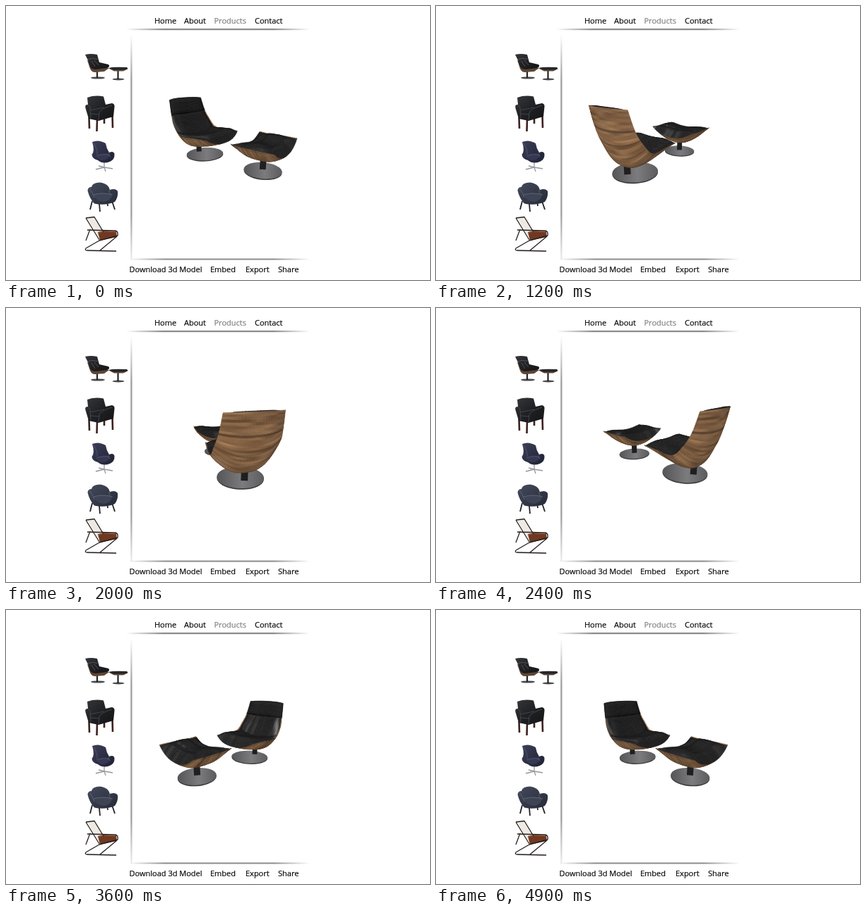
Animation, 600 px wide and 389 px high, one loop 5 s. Source, as an HTML page with a canvas:

```html
<!DOCTYPE html>
<html lang="en">
<head>
<meta charset="utf-8">
<title>Chair viewer</title>
<style>
  html, body { margin: 0; width: 100%; height: 100%; overflow: hidden; background: #fff; }
  svg, canvas { position: absolute; left: 0; top: 0; width: 100%; height: 100%; display: block; }
  text { font: 11px "Open Sans", "Noto Sans", sans-serif; fill: #0a0a0a; stroke: #0a0a0a; stroke-width: .2; }
  .active { fill: #808080; stroke: #808080; }
</style>
</head>
<body>
<svg viewBox="0 0 600 389">
  <defs>
    <linearGradient id="fadeX">
      <stop offset="0" stop-color="#777" stop-opacity="0"/>
      <stop offset=".2" stop-color="#777" stop-opacity=".85"/>
      <stop offset=".8" stop-color="#777" stop-opacity=".85"/>
      <stop offset="1" stop-color="#777" stop-opacity="0"/>
    </linearGradient>
    <linearGradient id="fadeY" x2="0" y2="1">
      <stop offset="0" stop-color="#888" stop-opacity="0"/>
      <stop offset=".2" stop-color="#888" stop-opacity=".85"/>
      <stop offset=".8" stop-color="#888" stop-opacity=".85"/>
      <stop offset="1" stop-color="#888" stop-opacity=".15"/>
    </linearGradient>
    <linearGradient id="black" x2="1" y2="1">
      <stop offset="0" stop-color="#36373a"/><stop offset=".5" stop-color="#202124"/><stop offset="1" stop-color="#141416"/>
    </linearGradient>
    <linearGradient id="navy" x2="1" y2="1">
      <stop offset="0" stop-color="#3c3f57"/><stop offset="1" stop-color="#1e2033"/>
    </linearGradient>
    <linearGradient id="slate" x2="1" y2="1">
      <stop offset="0" stop-color="#454b5c"/><stop offset="1" stop-color="#252936"/>
    </linearGradient>
  </defs>

  <g>
    <text x="210" y="24.5">Home</text>
    <text x="252" y="24.5">About</text>
    <text x="294.5" y="24.5" class="active">Products</text>
    <text x="352" y="24.5">Contact</text>
    <text x="174.5" y="378">Download 3d Model</text>
    <text x="289" y="378">Embed</text>
    <text x="339" y="378">Export</text>
    <text x="385" y="378">Share</text>
  </g>

  <g>
    <rect x="170" y="32" width="260" height="2" fill="url(#fadeX)"/>
    <rect x="170" y="34" width="260" height="1" fill="url(#fadeX)" opacity=".25"/>
    <rect x="174" y="358.5" width="256" height="2" fill="url(#fadeX)"/>
    <rect x="176.3" y="40" width="2" height="320" fill="url(#fadeY)"/>
    <rect x="178.3" y="40" width="1" height="320" fill="url(#fadeY)" opacity=".25"/>
  </g>

  <!-- lounge chair with footrest -->
  <g>
    <ellipse cx="130" cy="102" rx="10" ry="1.6" fill="#4b4b4d"/>
    <ellipse cx="159" cy="104" rx="8.500" ry="1.400" fill="#4b4b4d"/>
    <path d="M129 93V102M158.500 91V104" stroke="#222" stroke-width="2.200"/>
    <path d="M115 77L119 89Q121 94 126 94L139 93L146 88L132 86Z" fill="#5e4634"/>
    <path d="M112 69Q120 67 129 69L132 80L145 83Q148 86 143 88L127 90Q121 90 119 86L116 77Z" fill="url(#black)"/>
    <path d="M115 76Q122 73 130 75.500M121 78L126 86M125 77L131 84" fill="none" stroke="#66686c" stroke-width=".7"/>
    <path d="M145 88.500L153 92.500H166L173 89Z" fill="#5e4634"/>
    <path d="M145 88Q151 86 171 87Q174 89 169 90.500L153 91Z" fill="#28282a"/>
  </g>

  <!-- armchair -->
  <g>
    <path d="M117.500 158L118 174M129 160L128.500 178M150.500 154L151 173M139 158L139 167" stroke="#3f211f" stroke-width="2.600"/>
    <path d="M115 130Q126 126 138 128.500L141 140L150 138Q154 139 153.500 143L152 157L131 163L117 160L112.500 145Q111 140 116 140Z" fill="url(#black)"/>
    <path d="M115 141Q119 141 119 146L120 159M119 148L139 144M131 162L132 151Q134 146 150 141M120 153L132 154" fill="none" stroke="#4c4d51" stroke-width=".8"/>
  </g>

  <!-- egg chair -->
  <g>
    <path d="M139 220V230M139 229L127 232M139 229L151 231M139 229L141 235M139 229L131 227" fill="none" stroke="#96989c" stroke-width="1.300"/>
    <path d="M122 193Q131 189 141 195Q142 202 146 208Q152 205 153.500 210Q154 218 147 221Q137 225 130 219Q122 217 121.500 211Q126 206 122 193Z" fill="url(#navy)"/>
    <path d="M128 212Q138 207 147 211Q145 219 136 219Q129 218 128 212Z" fill="#353850"/>
    <path d="M124 195Q130 203 129 211M146 208Q143 211 148 215M128 213Q139 209 147 212" fill="none" stroke="#5b5e78" stroke-width=".7"/>
  </g>

  <!-- bucket chair -->
  <g>
    <path d="M122 277L119 289M132 281L133 292M150 277L154 289M143 276L144 284" stroke="#202228" stroke-width="1.800"/>
    <path d="M115.500 262Q116 257 121 257Q122 251 133 250.500Q145 252 147 261Q155 258 158 263Q159 271 154 278Q140 284 125 280.500Q118 273 115.500 262Z" fill="url(#slate)"/>
    <path d="M124 268Q137 263 150 268Q149 276 139 278Q127 277 124 268Z" fill="#3e4454"/>
    <path d="M118 259Q123 265 125 272M124 268Q137 264 151 268M147 261Q144 264 148 267" fill="none" stroke="#676e80" stroke-width=".8"/>
  </g>

  <!-- sling chair -->
  <g>
    <ellipse cx="136" cy="348" rx="22" ry="1.200" fill="#ececec"/>
    <path d="M114 300L125 300L138 321L131 328Z" fill="#eee9e3"/>
    <path d="M130 321L139 319L156 320L157 328L133 333Z" fill="#713821"/>
    <path d="M131 322L140 320L155 321" fill="none" stroke="#99573a" stroke-width="1"/>
    <path d="M113 301L132 332M113 301L125 299.500L138 321M115 318L155 319Q159 320 158 326L132 333L113 344Q111 347 115 347L156 348M119 317L113 333M157 327L133 347" fill="none" stroke="#26211f" stroke-width="1.300" stroke-linejoin="round"/>
  </g>
</svg>
<canvas id="view"></canvas>

<script>
const LOOP = 5000, STEP = 100;
const TILT = 0.34, UP = 0.94, DIST = 260;
const canvas = document.getElementById('view');
const ctx = canvas.getContext('2d');
const ratio = Math.max(1, window.devicePixelRatio || 1);
canvas.width = 600 * ratio;
canvas.height = 389 * ratio;

// Each shell runs from its front edge to its rear edge:
// mid = centre line [forward, height], rim = side line,
// half = half width, pad = cushion thickness.
const chair = {
  at: -46, disc: 28.5, stem: -13, seams: [0.48, 0.8], head: 0.8, rows: 44,
  mid: [[42, 28], [12, 18], [-18, 15], [-31, 37], [-38, 61], [-43, 85]],
  rim: [[38, 37], [14, 37], [-9, 37], [-22, 50], [-29, 64], [-34, 84]],
  half: [[34], [37], [38], [37], [34], [31]],
  pad: [[16], [19], [20], [16], [12], [11]]
};
const stool = {
  at: 54, disc: 24, stem: 0, seams: [], head: 2, rows: 30,
  mid: [[29, 28], [16, 20], [0, 18], [-14, 20], [-26, 29]],
  rim: [[28, 40], [15, 40], [0, 40], [-14, 40], [-25, 41]],
  half: [[36], [37], [37], [37], [36]],
  pad: [[14], [20], [22], [20], [14]]
};
const COLS = 28;
// columns crowd towards the sides, leaving a thin bare rim
const across = j => { const t = 2 * j / COLS - 1; return t * (1.3 - 0.3 * t * t); };
const EDGE = across(COLS - 1);

const clamp = (x, lo, hi) => Math.min(hi, Math.max(lo, x));
const mix = (a, b, k) => a + (b - a) * k;

function hash(i, j) {
  const n = Math.sin(i * 127.1 + j * 311.7) * 43758.5453;
  return n - Math.floor(n);
}

function noise(x, y) {
  const i = Math.floor(x), j = Math.floor(y);
  const ease = k => k * k * (3 - 2 * k);
  const a = ease(x - i), b = ease(y - j);
  return mix(mix(hash(i, j), hash(i + 1, j), a), mix(hash(i, j + 1), hash(i + 1, j + 1), a), b);
}

// Catmull-Rom through evenly spaced keys
function spline(keys, p) {
  const last = keys.length - 1;
  const x = clamp(p, 0, 1) * last, i = Math.min(last - 1, Math.floor(x)), t = x - i;
  const key = n => keys[clamp(n, 0, last)];
  return keys[0].map((_, n) => {
    const a = key(i - 1)[n], b = key(i)[n], c = key(i + 1)[n], d = key(i + 2)[n];
    return b + 0.5 * t * (c - a + t * (2 * a - 5 * b + 4 * c - d + t * (3 * (b - c) + d - a)));
  });
}

function padding(part, p, v) {
  const side = Math.max(0, 1 - Math.pow(Math.abs(v) / EDGE, 4));
  const end = Math.sqrt(clamp(Math.min(p, 1 - p) / 0.06, 0, 1));
  const groove = part.seams.reduce((k, s) => k * (1 - 0.2 * Math.exp(-(((p - s) / 0.02) ** 2))), 1);
  return spline(part.pad, p)[0] * side * end * groove;
}

function shellPoint(part, p, v, inner) {
  const mid = spline(part.mid, p), rim = spline(part.rim, p), half = spline(part.half, p)[0];
  const bend = Math.pow(Math.abs(v), 2.4);
  let u = mix(mid[0], rim[0], bend), y = mix(mid[1], rim[1], bend);
  if (inner) {
    const a = spline(part.mid, p - 0.06), b = spline(part.mid, p + 0.06);
    const du = b[0] - a[0], dy = b[1] - a[1], len = Math.hypot(du, dy), k = padding(part, p, v);
    u += k * dy / len;
    y -= k * du / len;
  }
  return [part.at + u, half * v, y];
}

function buildMesh(part) {
  part.layers = [false, true].map(inner => {
    const grid = [];
    for (let i = 0; i <= part.rows; i++) {
      const row = [];
      for (let j = 0; j <= COLS; j++) row.push(shellPoint(part, i / part.rows, across(j), inner));
      grid.push(row);
    }
    return { inner, grid };
  });
}
[chair, stool].forEach(buildMesh);

function projector(angle) {
  const s = Math.sin(angle), c = Math.cos(angle);
  return ([u, v, y]) => {
    const X = u * s + v * c, Z = u * c - v * s;
    const depth = UP * Z + TILT * (y - 18), k = DIST / (DIST - depth);
    return { X, Y: y, Z, depth, k, x: 315 + k * X, y: 204 + k * (16.5 + TILT * Z - UP * y) };
  };
}

function normal(a, b, c, d, sign) {
  const p = [c.X - a.X, c.Y - a.Y, c.Z - a.Z], q = [d.X - b.X, d.Y - b.Y, d.Z - b.Z];
  const n = [p[1] * q[2] - p[2] * q[1], p[2] * q[0] - p[0] * q[2], p[0] * q[1] - p[1] * q[0]];
  const len = (Math.hypot(...n) || 1) * sign;
  return n.map(x => x / len);
}

const dot = (n, x, y, z) => Math.max(0, n[0] * x + n[1] * y + n[2] * z);

function woodColor(part, p, v, n) {
  const grain = 0.5 * noise(p * 24, v * 1.2 + 9) + 0.5 * noise(p * 60, v * 2.5);
  let light = 0.72 + 0.34 * dot(n, -0.25, 0.5, 0.83);
  if (Math.abs(p - part.head) < 0.012) light *= 0.7;
  const tone = (lo, hi) => Math.round(mix(lo, hi, grain) * light);
  return `rgb(${tone(94, 184)},${tone(67, 140)},${tone(45, 99)})`;
}

function leatherColor(part, p, v, n) {
  const streak = noise(v * 11 + p * 2, p * 5 + part.disc);
  const fade = p > part.head ? 0.25 : 1;
  let g = 22 + 12 * dot(n, -0.25, 0.8, 0.55) + 125 * fade * Math.pow(dot(n, -0.13, 0.6, 0.79), 10) * streak ** 2.5;
  if (part.seams.some(s => Math.abs(p - s) < 0.012)) g *= 0.6;
  g = Math.round(g);
  return `rgb(${g},${g},${g + 1})`;
}

function tracePath(points) {
  ctx.beginPath();
  points.forEach(q => ctx.lineTo(q.x, q.y));
  ctx.closePath();
}

function drawFoot(part, project) {
  const ring = y => Array.from({ length: 48 }, (_, i) => {
    const a = i * Math.PI / 24;
    return project([part.at + part.disc * Math.cos(a), part.disc * Math.sin(a), y]);
  });
  tracePath(ring(0));
  ctx.fillStyle = '#3c3c3e';
  ctx.fill();
  const top = ring(1.5), xs = top.map(q => q.x);
  const shine = ctx.createLinearGradient(Math.min(...xs), 0, Math.max(...xs), 0);
  shine.addColorStop(0, '#555557');
  shine.addColorStop(0.55, '#7c7c7e');
  shine.addColorStop(1, '#5c5c5e');
  tracePath(top);
  ctx.fillStyle = shine;
  ctx.fill();

  const low = project([part.at + part.stem, 0, 2]), high = project([part.at + part.stem, 0, 20]);
  ctx.beginPath();
  ctx.moveTo(low.x, low.y);
  ctx.lineTo(high.x, high.y);
  ctx.lineWidth = 8 * low.k;
  ctx.strokeStyle = '#1f1f21';
  ctx.stroke();
}

function drawShell(part, project) {
  const faces = [];
  for (const { inner, grid } of part.layers) {
    const pts = grid.map(row => row.map(project));
    for (let i = 0; i < part.rows; i++) {
      for (let j = 0; j < COLS; j++) {
        const a = pts[i][j], b = pts[i + 1][j], c = pts[i + 1][j + 1], d = pts[i][j + 1];
        const area = (c.x - a.x) * (d.y - b.y) - (c.y - a.y) * (d.x - b.x);
        if (inner ? area <= 0 : area >= 0) continue;
        const p = (i + 0.5) / part.rows, v = across(j + 0.5);
        const n = normal(a, b, c, d, inner ? -1 : 1);
        const bare = !inner || (Math.abs(v) > EDGE && p < part.head);
        faces.push({
          quad: [a, b, c, d],
          depth: a.depth + b.depth + c.depth + d.depth,
          color: (bare ? woodColor : leatherColor)(part, p, v, n)
        });
      }
    }
  }
  faces.sort((f, g) => f.depth - g.depth);
  ctx.lineWidth = 0.6;
  ctx.lineJoin = 'round';
  for (const f of faces) {
    tracePath(f.quad);
    ctx.fillStyle = ctx.strokeStyle = f.color;
    ctx.fill();
    ctx.stroke();
  }
}

function draw(time) {
  const angle = (54 + 360 * time / LOOP) * Math.PI / 180;
  const project = projector(angle);
  ctx.setTransform(ratio, 0, 0, ratio, 0, 0);
  ctx.clearRect(0, 0, 600, 389);
  const order = Math.cos(angle) > 0 ? [chair, stool] : [stool, chair];
  for (const part of order) {
    drawFoot(part, project);
    drawShell(part, project);
  }
}

const start = performance.now();
let shown = -1;
function tick() {
  const time = Math.floor((performance.now() - start) % LOOP / STEP) * STEP;
  if (time !== shown) draw(shown = time);
  requestAnimationFrame(tick);
}
tick();
</script>
</body>
</html>
```
